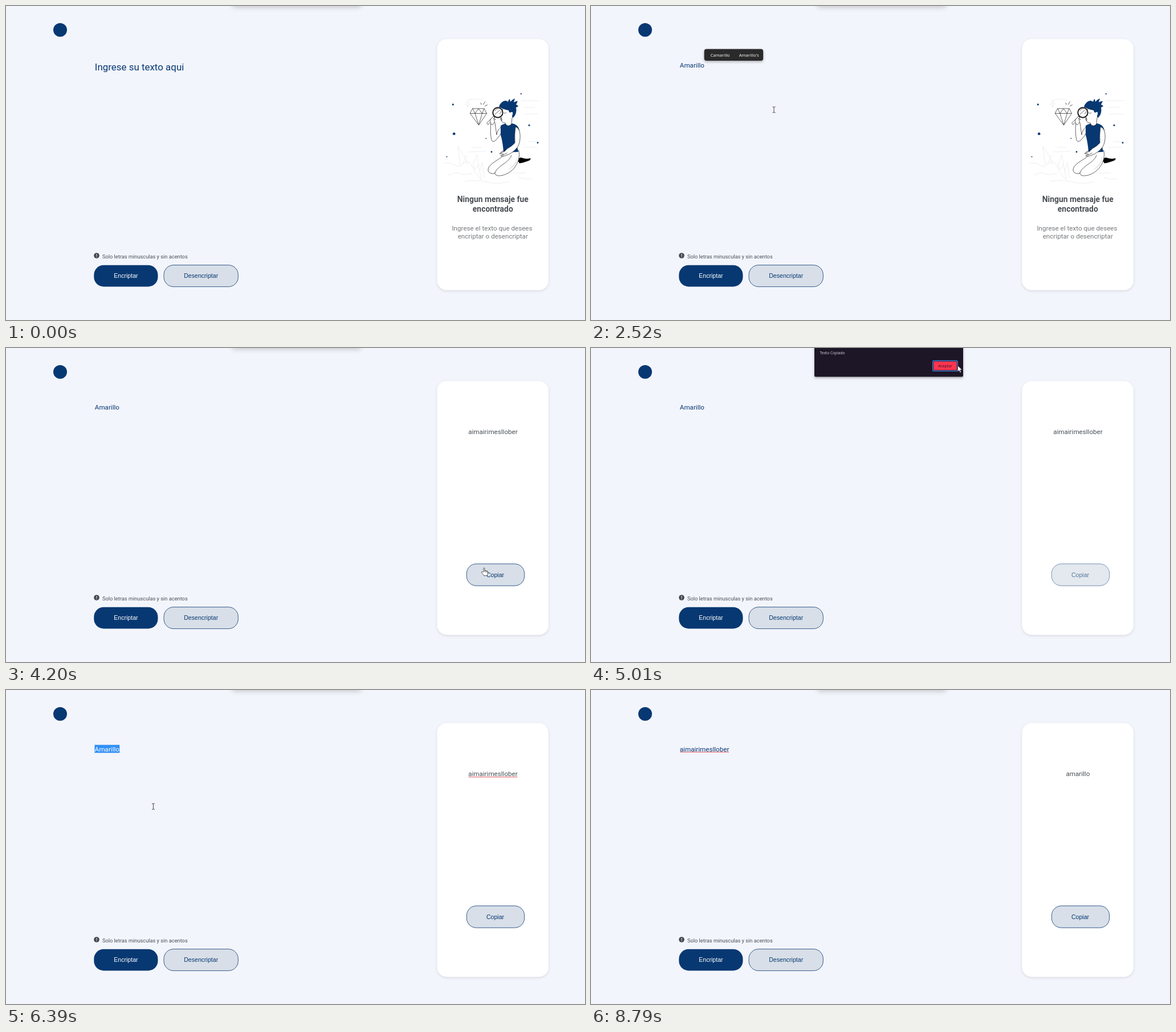
Write an HTML page that moves like this. It is 1016 by 551 pixels and loops after 9150 ms.

```html
<!DOCTYPE html>
<html lang="es">
<head>
<meta charset="utf-8">
<style>
html, body { margin: 0; width: 100%; height: 100%; overflow: hidden; background: #f3f5fc; }
svg { display: block; width: 100vw; height: 100vh; }
text { font-family: Roboto, sans-serif; font-size: 11.64px; white-space: pre; }
.mid { text-anchor: middle; }
.btn text { font-family: "Liberation Sans", Arial, sans-serif; font-size: 10.58px; text-anchor: middle; }
.light rect { fill: #d8dfe8; stroke: #0a3871; stroke-width: .8; }
.ui { font-family: "Noto Sans", sans-serif; }
.blue { fill: #073872; }
.ink { fill: #fff; stroke: #222; stroke-width: .7; stroke-linejoin: round; stroke-linecap: round; }
.line { fill: none; stroke: #222; stroke-width: .7; stroke-linecap: round; }
.faint { fill: none; stroke: #e9e9ec; stroke-width: .8; }
.spell { fill: #e0444f; }
</style>
</head>
<body>
<svg viewBox="0 0 1016 551">
  <defs>
    <filter id="blur" x="-20%" y="-100%" width="140%" height="300%"><feGaussianBlur stdDeviation="5"/></filter>
    <filter id="soft" x="-10%" y="-10%" width="120%" height="130%"><feDropShadow dx="0" dy="1.5" stdDeviation="2.2" flood-opacity=".13"/></filter>
    <filter id="pop" x="-20%" y="-40%" width="140%" height="220%"><feDropShadow dx="0" dy="2" stdDeviation="2" flood-opacity=".3"/></filter>
  </defs>
  <rect width="1016" height="551" fill="#f3f5fc"/>
  <rect x="397" y="-30" width="226" height="32" rx="4" opacity=".2" filter="url(#blur)"/>
  <circle class="blue" cx="95" cy="42" r="12"/>

  <text id="hint" class="blue" x="155.8" y="113" style="font-size:16.93px">Ingrese su texto aqui</text>
  <rect id="mark" x="155.5" y="96.3" width="43.8" height="14" fill="#318ff5"/>
  <text id="input" x="155.8" y="107.5"></text>
  <rect id="inputSpell" class="spell" x="156" y="108.6" width="86" height=".9"/>
  <rect id="caret" class="blue" y="96.5" width=".9" height="13.5"/>

  <circle cx="159" cy="438" r="4.8" fill="#44494f"/>
  <path d="M159 435.2v3.4m0 1.2v1.1" stroke="#fff" stroke-width="1.1"/>
  <text x="169" y="442.6" fill="#495057" style="font-size:9.27px">Solo letras minusculas y sin acentos</text>
  <g id="encode" class="btn">
    <rect class="blue" x="154.3" y="454.8" width="112.2" height="37.6" rx="17"/>
    <text x="210.4" y="477" fill="#fff">Encriptar</text>
  </g>
  <g id="decode" class="btn light">
    <rect x="277" y="454.6" width="130.4" height="38" rx="17"/>
    <text class="blue" x="342.2" y="477">Desencriptar</text>
  </g>

  <rect id="card" x="756.5" y="58" width="195.5" rx="17" fill="#fff" filter="url(#soft)"/>
  <g id="empty">
    <g class="faint">
      <path d="M810 164.500q14-2 26 0M904 166h31M908 178h20M910 190l24-1M818 248h16M812 256l30-1M908 248h24M916 238h22M899 301q14 4 24 2"/>
      <path d="M769 277q10-4 18 2t16-3 14 4 12-2M776 297l14-5 12 4 16-2M805 308q22-4 40 1t38-1M890 293h22"/>
      <path d="M797 279l-4-33 12 19 5 14M801 277l8-16M820 277l6-16 8 44-12-14zM831 289l5-14 3 26M806 172q4-1 4-6 0 5 4 6-4 1-4 6 0-5-4-6"/>
    </g>
    <g id="dots" class="blue"></g>
    <path class="ink" d="M819 180h20l4.500 8.500-14 20.500-15-20.500zM814.500 188.500h29M819 180l4 8.500 6.500 20.500 6-20.500 3.500-8.500M823 188.500l6-8.500 6.500 8.500"/>
    <path class="line" d="M834 173l-1-3M837.500 173l3-5M840.500 175.500l4-2"/>
    <!-- legs and shoe -->
    <path d="M897 270q5-6 10-3 8 2 13 0 2 3-4 5-8 3-15 4z"/>
    <path class="ink" d="M900 254q3 16-8 30-7 9-20 13-12 3-14-3-2-7 9-15l17-25z"/>
    <path class="ink" d="M884 255q-15 11-29 20-10 7-9 14 2 6 11 5 3-8 12-14 16-10 18-18"/>
    <path d="M897 260q0 18-18 28 12-4 16-13 3-7 2-15" fill="#e2e2e4"/>
    <!-- raised arm -->
    <path class="ink" d="M868 213q-6 5-7 13l-3-21-7-2q-2 20 1 32 2 5 7 1 8-8 11-15z"/>
    <path class="blue" d="M868 210q9-6 20-4 12 2 13 14 0 15-4 27l2 9-26 1q-1-17-5-31z"/>
    <path class="ink" d="M894 212q7 2 8 13 1 13-4 22-8 11-20 15-5 3-10 1l5-3-7-1 9-4 5-5q8-4 13-10-1-14 1-28z"/>
    <path class="line" d="M868 257l8-5M872 262l7-4"/>
    <!-- head -->
    <path class="ink" d="M873 178q-5 8-5 18 1 10 8 9l2 4q5 3 9-2l1-11q7-4 5-14l-8-7z"/>
    <path class="blue" d="M865 177q3-10 12-11l4 2q1-4 3-5l1 5q4-4 8-6l-2 7q3-2 7-2l-3 6q3 1 4 3l-4 2q2 10-4 17-3 2-3-2 3-8-1-7-4 3-5-3-8-1-17-6z"/>
    <path class="line" d="M874 188q3 1 4-1M877 181q3-2 5 1M869 196q2 2 1 5-3-1-1-5"/>
    <path class="ink" d="M844 205l12-12 2 2-12 13z"/>
    <circle cx="863" cy="187" r="8.700" fill="#fff" stroke="#111" stroke-width="1.900"/>
    <path class="line" d="M858 190l8-7M866 189q3-1 3-4M864 180q-4 0-6 4"/>
    <path class="ink" d="M851 207q-3-5 0-9l4-4 3 2-3 2 4 1-3 2 2 2-4 5z"/>
    <g class="mid" fill="#494d52" style="font-weight:700">
      <text x="854.300" y="344" style="font-size:13.900px">Ningun mensaje fue</text>
      <text x="854.300" y="361" style="font-size:13.900px">encontrado</text>
    </g>
    <g class="mid" fill="#75787c">
      <text x="853" y="394">Ingrese el texto que desees</text>
      <text x="854.300" y="408">encriptar o desencriptar</text>
    </g>
  </g>
  <g id="result">
    <text id="output" class="mid" x="854.4" y="151" fill="#495057"></text>
    <rect id="outputSpell" class="spell" x="811.3" y="152.300" width="86" height=".9"/>
    <g id="copy" class="btn light">
      <rect x="808.300" y="378.800" width="101.400" height="38.400" rx="17"/>
      <text class="blue" x="858.500" y="401.500">Copiar</text>
    </g>
  </g>

  <g id="popup" filter="url(#pop)">
    <rect y="75.500" width="103.500" height="20.500" rx="4" fill="#2b2b2b"/>
    <g fill="#f2f2f2">
      <text class="ui" x="11" y="88.800" style="font-size:7.600px">Camarillo</text>
      <text class="ui" x="61" y="88.800" style="font-size:7.600px">Amarillo's</text>
    </g>
  </g>

  <g id="dialog">
    <rect x="392" y="-10" width="261" height="60.500" rx="2" fill="#1d1825" filter="url(#pop)"/>
    <text class="ui" x="401.600" y="11.200" fill="#cdc8d6" style="font-size:6.600px">Texto Copiado</text>
    <rect x="599.700" y="22.300" width="43.600" height="18" rx="2" fill="#1d1825" stroke="#3d8df0" stroke-width="1.300"/>
    <rect x="601.200" y="23.800" width="40.600" height="15" rx="1" fill="#fa3650"/>
    <text class="ui mid" x="621.500" y="33.600" fill="#4a1226" style="font-size:6.800px">Aceptar</text>
  </g>

  <g id="cursor">
    <path id="beam" d="M-2.500-5h2l.5.5.5-.5h2M-2.500 5h2l.5-.5.5.5h2M0-4.500v9" fill="none" stroke="#333" stroke-width=".9"/>
    <path id="arrow" d="M0 0v10.500l2.500-2.300 1.700 4 1.700-.8-1.700-3.800h3.500z" fill="#fff" stroke="#222" stroke-width=".6"/>
    <path id="hand" class="ink" d="M-1 6.500v-5.500q0-1.200 1-1.200t1 1.200v3.600q1.700-.8 2 .4 1.600-.7 2 .6 1.500-.5 1.600.9 0 4.500-1.600 7h-5.500q-1.300-3-4.300-5.500 0-1.800 1.900-1.200zM1 4.600v2.200M3 5v2.200M5 5.600v2"/>
  </g>
</svg>
<script>
const LOOP = 9150, STEP = 30;
const ui = Object.fromEntries([...document.querySelectorAll('[id]')].map(e => [e.id, e]));
const show = (e, on) => { e.style.display = on ? '' : 'none'; };
const within = (t, a, b) => t >= a && t < b;
const inBox = ([x, y], l, top, r, b) => x > l && x < r && y > top && y < b;

ui.dots.innerHTML = [[784.3, 172.8, 1.6], [786.2, 224.3, 2.3], [903.8, 154.2, 1.1], [918, 209.3, 1.5],
  [933, 240, 1.4], [852, 256, 1.4], [842.3, 232.4, .9], [773.5, 264.5, 1]]
  .map(([x, y, r]) => `<circle cx="${x}" cy="${y}" r="${r}"/>`).join('');

// Pointer stops: time, x, y
const path = [
  [30, 580, 6], [420, 322, 110], [2220, 322, 110], [2520, 321, 182], [2940, 161, 479],
  [3660, 161, 479], [4170, 839, 386], [4740, 839, 386], [5010, 643.5, 31], [5130, 632, 32],
  [5310, 632, 32], [5640, 218, 105], [5790, 188, 103], [6270, 188, 103], [6540, 357, 346],
  [6900, 357, 346], [7170, 391.5, 328], [7590, 284, 478], [8220, 284, 478], [8760, 557, -4]
];

function pointer(t) {
  let i = 1;
  while (i < path.length - 1 && path[i][0] < t) i++;
  const [t0, x0, y0] = path[i - 1], [t1, x1, y1] = path[i];
  const u = Math.min(1, Math.max(0, (t - t0) / (t1 - t0)));
  const e = u * u * (3 - 2 * u);
  return [x0 + (x1 - x0) * e, y0 + (y1 - y0) * e];
}

// The caret blinks every 240 ms while the field has focus
function caretOn(t) {
  const start = t < 900 ? 420 : t < 1740 ? t : t < 3300 ? 1740 : 6690;
  const focused = within(t, 420, 3300) || within(t, 6690, 7740);
  return focused && Math.floor((t - start) / 240) % 2 === 0;
}

function draw(t) {
  const encoded = t >= 3330, decoded = t >= 7740, pasted = t >= 6690;
  const selected = within(t, 5940, 6690), dialog = within(t, 4500, 5310);

  const typed = t < 900 ? 0 : 1 + Math.floor((t - 900) / 120);
  ui.input.textContent = pasted ? 'aimairimesllober' : 'Amarillo'.slice(0, typed);
  ui.input.setAttribute('fill', selected ? '#fff' : '#073872');
  show(ui.hint, t < 900);
  show(ui.mark, selected);
  show(ui.inputSpell, pasted);

  const end = 155.8 + (typed ? ui.input.getComputedTextLength() : 0);
  ui.caret.setAttribute('x', end - .3);
  show(ui.caret, caretOn(t));
  ui.popup.setAttribute('transform', `translate(${end - .3} 0)`);
  show(ui.popup, within(t, 1380, 1740) || within(t, 1830, 3300));

  ui.card.setAttribute('height', encoded ? 445.3 : 440.6);
  show(ui.empty, !encoded);
  show(ui.result, encoded);
  ui.output.textContent = decoded ? 'amarillo' : 'aimairimesllober';
  show(ui.outputSpell, within(t, 5850, 7740));
  show(ui.dialog, dialog);

  ui.encode.style.opacity = within(t, 3210, 3390) ? .7 : 1;
  ui.decode.style.opacity = within(t, 7650, 7830) ? .7 : 1;
  ui.copy.style.opacity = within(t, 4410, 5340) ? .68 : 1;

  const p = pointer(t);
  const onButton = inBox(p, 154, 455, 267, 492) || inBox(p, 277, 455, 407, 492) ||
    encoded && inBox(p, 808, 379, 910, 417);
  const kind = dialog ? 'arrow' : onButton ? 'hand' : inBox(p, 155, 96, 735, 425) ? 'beam' : 'arrow';
  for (const k of ['beam', 'arrow', 'hand']) show(ui[k], k === kind);
  ui.cursor.setAttribute('transform', `translate(${p[0]} ${p[1]})`);
  show(ui.cursor, within(t, 30, 900) || within(t, 2220, 8760));
}

const began = performance.now();
function tick() {
  const t = (performance.now() - began) % LOOP;
  draw(Math.floor(t / STEP) * STEP);
  requestAnimationFrame(tick);
}
tick();
</script>
</body>
</html>
```
